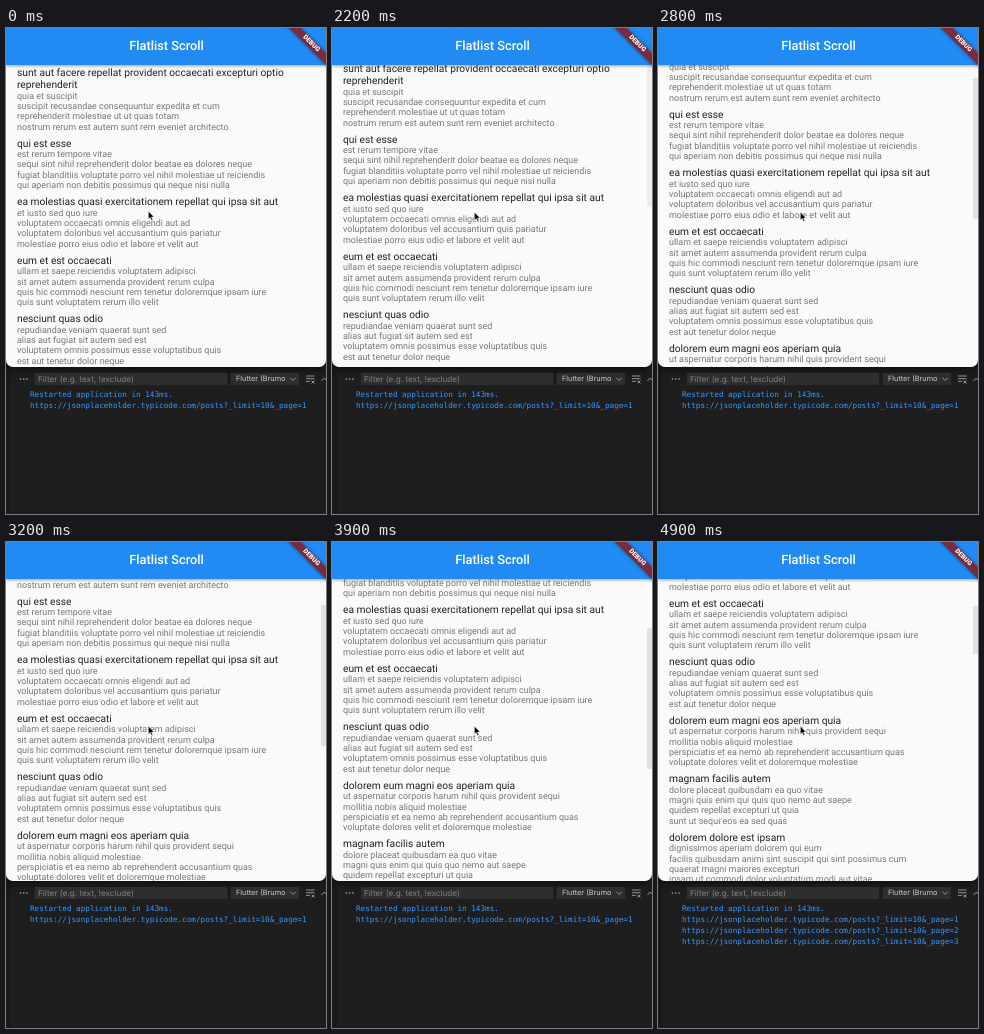
An HTML page for the animation above (5 s loop, 320 by 486 pixels).

```html
<!DOCTYPE html>
<html lang="en">
<head>
<meta charset="utf-8">
<title>Flatlist Scroll</title>
<style>
html, body { margin: 0; width: 100%; height: 100%; overflow: hidden; background: #1e1e1e; }
#stage { position: relative; width: 320px; height: 486px; overflow: hidden; background: #1e1e1e; text-rendering: geometricPrecision; white-space: pre; }
#stage div, #stage svg { position: absolute; }
.edge { left: 0; top: 336px; width: 5px; height: 150px; background: #191919; }

#app { left: 0; top: 0; width: 320px; height: 339px; overflow: hidden; border-radius: 0 0 7px 7px; background: #fafafa; font-family: Roboto, sans-serif; }
.shade { left: 0; top: 0; width: 320px; height: 339px; border-radius: 0 0 7px 7px; box-shadow: 0 2px 8px rgba(0,0,0,.6); }
#bar { left: 0; top: 0; width: 321px; height: 36.5px; background: #218bf3; color: #fff; font: 500 12.8px/38.4px Roboto, sans-serif; text-align: center; box-shadow: 0 1px 3px rgba(0,0,0,.38); }
#list { left: 11px; top: 38.8px; }
#list h2 { margin: 0; font: 400 10.24px/12.4px Roboto, sans-serif; color: #222; }
#list p { margin: 0 0 4.75px; font: 400 8.96px/10.35px Roboto, sans-serif; color: #777; }
#thumb { right: 0; width: 5px; background: rgba(0,0,0,.1); }
#ribbon { left: 264.6px; top: 12.1px; width: 80px; height: 7.7px; transform: rotate(45deg); background: #792c3f; color: #fff; box-shadow: 0 0 4px rgba(0,0,0,.5); font: 900 6.5px/7.9px Roboto, sans-serif; text-align: center; }

.field { top: 345px; height: 12px; background: #2e2e2e; font-family: Inter, sans-serif; }
.filter { left: 29px; width: 192px; color: #808080; font-size: 8.2px; line-height: 12.6px; text-indent: 3px; }
.device { left: 225px; width: 68px; color: #ccc; font-size: 7.3px; line-height: 12.6px; text-indent: 5px; }
#log { left: 24px; top: 361px; color: #3797ff; font: 7.67px/11px "DejaVu Sans Mono", monospace; }
</style>
</head>
<body>
<div id="stage">
  <div class="edge"></div>
  <div class="shade"></div>
  <div class="field filter">Filter (e.g. text, !exclude)</div>
  <div class="field device">Flutter (Brumo</div>
  <svg width="320" height="20" style="left:0;top:341px" fill="none" stroke="#a0a0a0" stroke-width=".9">
    <g fill="#808080" stroke="none"><circle cx="14.5" cy="10" r=".9"/><circle cx="17.7" cy="10" r=".9"/><circle cx="20.9" cy="10" r=".9"/></g>
    <path d="M284.5 8.8l2.6 2.6 2.6-2.6M300 7h8.5M300 9.7h8.5M300 12.4h4M305.5 11.5l3 3m0-3l-3 3M315.5 12l2.8-3 2.8 3"/>
  </svg>
  <div id="log"></div>

  <div id="app">
    <div id="list"></div>
    <div id="thumb"></div>
    <div id="bar">Flatlist Scroll</div>
    <div id="ribbon">DEBUG</div>
  </div>

  <svg id="cursor" width="9" height="13" viewBox="-1 -1 9 13" style="left:141px">
    <path d="M.3 0V8.3L2.2 6.6 3.5 9.6 4.9 9 3.6 6.1H6.2Z" fill="#000" stroke="#fff" stroke-width=".6"/>
  </svg>
</div>

<script>
const posts = [
  `sunt aut facere repellat provident occaecati excepturi optio
reprehenderit|quia et suscipit
suscipit recusandae consequuntur expedita et cum
reprehenderit molestiae ut ut quas totam
nostrum rerum est autem sunt rem eveniet architecto`,
  `qui est esse|est rerum tempore vitae
sequi sint nihil reprehenderit dolor beatae ea dolores neque
fugiat blanditiis voluptate porro vel nihil molestiae ut reiciendis
qui aperiam non debitis possimus qui neque nisi nulla`,
  `ea molestias quasi exercitationem repellat qui ipsa sit aut|et iusto sed quo iure
voluptatem occaecati omnis eligendi aut ad
voluptatem doloribus vel accusantium quis pariatur
molestiae porro eius odio et labore et velit aut`,
  `eum et est occaecati|ullam et saepe reiciendis voluptatem adipisci
sit amet autem assumenda provident rerum culpa
quis hic commodi nesciunt rem tenetur doloremque ipsam iure
quis sunt voluptatem rerum illo velit`,
  `nesciunt quas odio|repudiandae veniam quaerat sunt sed
alias aut fugiat sit autem sed est
voluptatem omnis possimus esse voluptatibus quis
est aut tenetur dolor neque`,
  `dolorem eum magni eos aperiam quia|ut aspernatur corporis harum nihil quis provident sequi
mollitia nobis aliquid molestiae
perspiciatis et ea nemo ab reprehenderit accusantium quas
voluptate dolores velit et doloremque molestiae`,
  `magnam facilis autem|dolore placeat quibusdam ea quo vitae
magni quis enim qui quis quo nemo aut saepe
quidem repellat excepturi ut quia
sunt ut sequi eos ea sed quas`,
  `dolorem dolore est ipsam|dignissimos aperiam dolorem qui eum
facilis quibusdam animi sint suscipit qui sint possimus cum
quaerat magni maiores excepturi
ipsam ut commodi dolor voluptatum modi aut vitae`
];

const LOOP = 5000, STEP = 100;
const VIEW = { top: 36.5, height: 303 };
const pageTimes = [0, 4600, 4800];       // when each page is requested
const contentHeights = [651, 1275, 1900];
const scrollKeys = [
  [0, 0], [2100, 0], [2200, 4], [2800, 29.5], [3600, 83.2],
  [3900, 106], [4000, 109], [4100, 109], [4300, 114.7], [4900, 171]
];

const $ = id => document.getElementById(id);
const list = $('list'), thumb = $('thumb'), log = $('log'), cursor = $('cursor');

for (const post of posts) {
  const [title, body] = post.split('|');
  const h = document.createElement('h2'), p = document.createElement('p');
  h.textContent = title;
  p.textContent = body;
  list.append(h, p);
}

function sample(keys, t) {
  const i = keys.findIndex(k => k[0] > t);
  if (i < 0) return keys[keys.length - 1][1];
  const [t0, a] = keys[i - 1], [t1, b] = keys[i];
  return a + (b - a) * (t - t0) / (t1 - t0);
}

function draw(t) {
  const y = sample(scrollKeys, t);
  const pages = pageTimes.filter(p => t >= p).length;
  const ratio = VIEW.height / contentHeights[pages - 1];

  list.style.transform = `translateY(${-y}px)`;
  thumb.style.top = VIEW.top + y * ratio + 'px';
  thumb.style.height = VIEW.height * ratio + 'px';
  thumb.style.opacity = Math.min(1, Math.max(0, (t - 2100) / 200));
  cursor.style.top = (t < 900 ? 182 : 182.5) + 'px';

  const lines = ['Restarted application in 143ms.'];
  for (let n = 1; n <= pages; n++)
    lines.push(`https://jsonplaceholder.typicode.com/posts?_limit=10&_page=${n}`);
  log.textContent = lines.join('\n');
}

let shown = -1;
function tick() {
  const t = Math.floor(performance.now() % LOOP / STEP) * STEP;
  if (t !== shown) draw(shown = t);
  requestAnimationFrame(tick);
}
tick();
</script>
</body>
</html>
```
